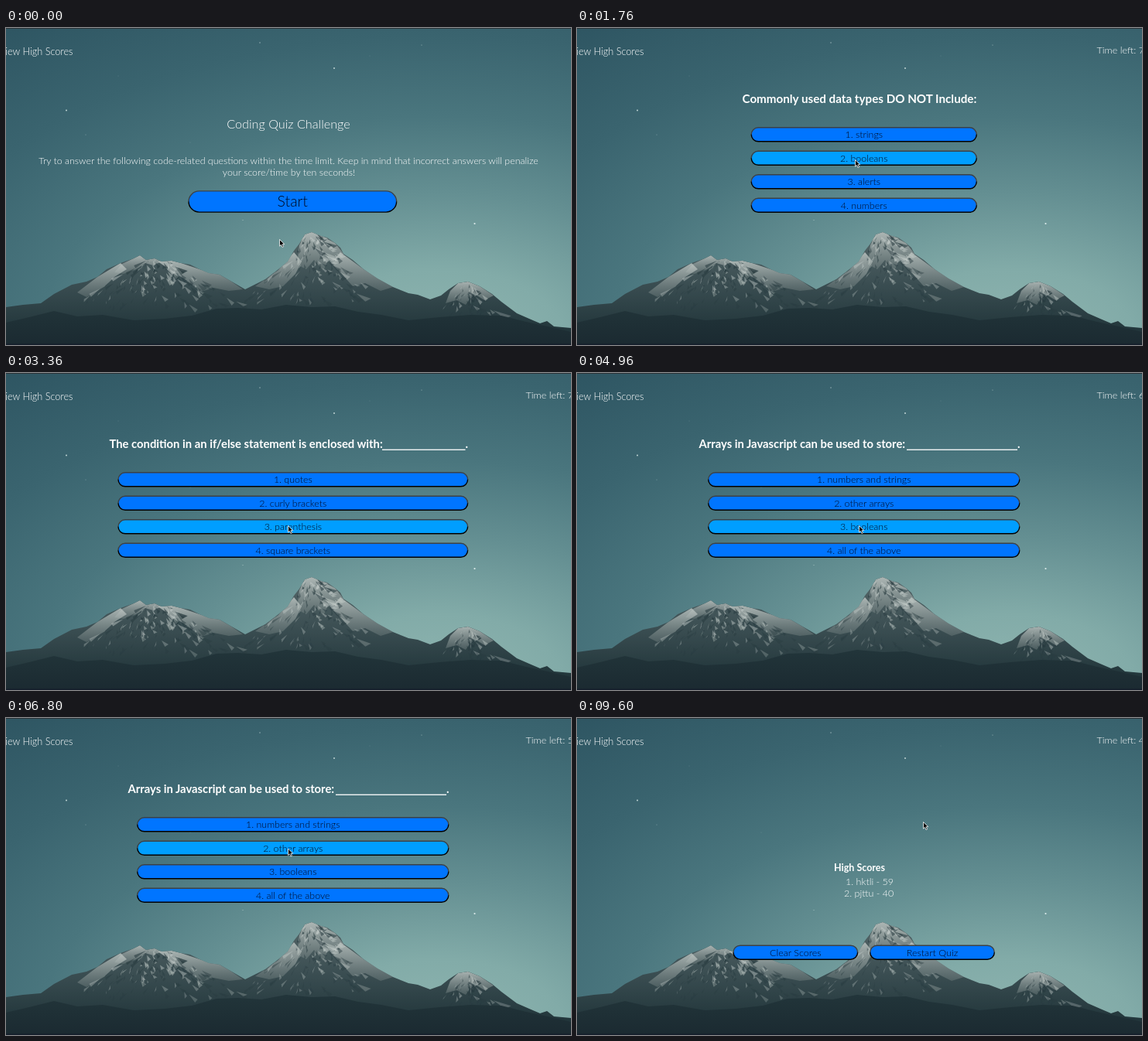
These frames come from a looping animation (730x410 px, 9.68 s). An HTML page:

```html
<!DOCTYPE html>
<html lang="en">
<head>
<meta charset="utf-8">
<title>Coding Quiz</title>
<style>
html, body { margin: 0; width: 100%; height: 100%; overflow: hidden; background: #355a65; }
svg { display: block; width: 730px; height: 410px; }
text { font-family: Lato, "Open Sans", sans-serif; font-weight: 300; fill: #fff; white-space: pre; }
.ink { fill: #000a20; }
.bold { font-weight: 700; }
</style>
</head>
<body>
<svg id="stage" viewBox="0 0 730 410" xmlns="http://www.w3.org/2000/svg">
  <defs>
    <radialGradient id="sky" gradientUnits="userSpaceOnUse" cx="0" cy="0" r="520"
      gradientTransform="translate(560 400) scale(1.8 1)">
      <stop offset="0" stop-color="#8fb5b0"/>
      <stop offset=".17" stop-color="#82aba8"/>
      <stop offset=".36" stop-color="#648f92"/>
      <stop offset=".55" stop-color="#4a767e"/>
      <stop offset=".75" stop-color="#3a646f"/>
      <stop offset="1" stop-color="#2d5461"/>
    </radialGradient>
    <linearGradient id="rock" gradientUnits="userSpaceOnUse" x1="0" y1="264" x2="0" y2="390">
      <stop offset="0" stop-color="#566769"/>
      <stop offset=".5" stop-color="#3c4f53"/>
      <stop offset="1" stop-color="#22363b"/>
    </linearGradient>
    <linearGradient id="snow" x1="0" y1="0" x2="0" y2="1">
      <stop offset="0" stop-color="#c3cbc8" stop-opacity=".8"/>
      <stop offset="1" stop-color="#8c9896" stop-opacity=".3"/>
    </linearGradient>
    <linearGradient id="front" x1="0" y1="0" x2="0" y2="1">
      <stop offset="0" stop-color="#22353a"/>
      <stop offset="1" stop-color="#1b2a31"/>
    </linearGradient>
    <linearGradient id="edge" x1="0" y1="0" x2="0" y2="1">
      <stop offset=".45" stop-color="#3c4146"/>
      <stop offset=".55" stop-color="#000"/>
    </linearGradient>
    <clipPath id="range"><path id="rangeShape"/></clipPath>
  </defs>
  <rect width="730" height="410" fill="url(#sky)"/>
  <g id="stars" fill="#dcebea"></g>
  <g id="hills"></g>
  <rect width="730" height="1" fill="#2b3338"/>
  <rect y="408.5" width="730" height="1.5" fill="#141d2b"/>
  <text x="86.5" y="35" font-size="12.7" text-anchor="end">View High Scores</text>
  <text id="timer" x="671.5" y="32.5" font-size="12.6"></text>
  <g id="scenes"></g>
  <path id="cursor" d="M0 0V8.6L2 6.8L3.4 10L5 9.3L3.6 6.2H6.3Z" fill="#000" stroke="#fff" stroke-width=".8"/>
</svg>
<script>
const NS = 'http://www.w3.org/2000/svg';
const LOOP = 9680, STEP = 80;
const BLUE = '#0075ff', HOVER = '#009eff';
const $ = id => document.getElementById(id);

function add(parent, tag, attrs, content) {
  const el = document.createElementNS(NS, tag);
  for (const k in attrs) el.setAttribute(k, attrs[k]);
  if (content) el.textContent = content;
  parent.appendChild(el);
  return el;
}

function label(parent, x, y, size, content, cls = '', anchor = 'start') {
  return add(parent, 'text', { x, y, 'font-size': size, class: cls, 'text-anchor': anchor }, content);
}

// Landscape
const RIDGE = 'M0 361L22 358L45 356L62 344L85 332L104 328L118 322L130 312L148 304L165 298L173 294' +
  'L181 300L192 298L201 302L214 301L226 304L238 306L250 312L262 317L276 319L290 327L309 338' +
  'L335 325L352 312L364 302L372 288L379 279L386 267L395 264L407 269L415 271L425 278L432 284' +
  'L436 292L448 300L462 312L480 324L500 335L520 343L532 345L548 351L562 346L572 338L584 330' +
  'L597 328L612 334L628 344L640 354L660 369L676 376L690 382L699 379L708 386L730 388V410H0Z';
const SNOW = [
  'M165 298L173 294L181 300L192 298L201 302L190 307L180 304L168 312L152 318L140 316L150 305Z',
  'M196 302L214 301L226 304L250 312L276 319L290 327L306 338L288 340L268 336L252 341L238 330L220 318Z',
  'M118 322L148 304L156 312L140 322L128 334L104 348L92 342Z',
  'M386 267L395 264L407 269L425 278L436 292L430 304L418 296L410 314L398 300L388 312L376 306L379 281Z',
  'M372 290L382 302L374 318L358 334L340 338L322 334L352 313Z',
  'M432 290L462 312L500 335L484 340L464 330L448 334L432 316L420 304Z',
  'M584 330L597 328L612 334L630 346L618 352L604 343L594 358L582 352L568 356L574 340Z'
];
const FRONT = 'M0 381L30 374L62 366L92 373L125 371L165 378L205 376L240 372L272 363L300 362L330 364' +
  'L362 358L395 361L425 360L455 367L485 371L520 378L560 374L600 371L640 372L672 380L700 386L730 393V410H0Z';

let seed = 11;
const rand = () => (seed = seed * 16807 % 2147483647) / 2147483647;

// thin shards of rock and snow falling away from a summit
function crags(g, cx, cy, w, h, count) {
  for (let i = 0; i < count; i++) {
    const v = rand(), side = rand() * 2 - 1;
    const x = cx + side * w * (.1 + v * .9), y = cy + v * h;
    const len = 4 + rand() * 10, lean = side * .8 + rand() - .5, wide = 1 + rand() * 3;
    const [dx, dy, bx] = [lean * len, len * .8, lean * len * .3 + wide].map(n => n.toFixed(1));
    add(g, 'path', {
      d: `M${x.toFixed(1)} ${y.toFixed(1)}l${dx} ${dy}l${bx} -${(len * .3).toFixed(1)}Z`,
      fill: rand() < .42 ? '#c0c9c6' : '#26393e',
      opacity: (.6 - v * .35).toFixed(2)
    });
  }
}

function drawLand() {
  $('rangeShape').setAttribute('d', RIDGE);
  const hills = $('hills');
  add(hills, 'path', { d: RIDGE, fill: 'url(#rock)' });
  const g = add(hills, 'g', { 'clip-path': 'url(#range)' });
  SNOW.forEach(d => add(g, 'path', { d, fill: 'url(#snow)' }));
  crags(g, 195, 298, 110, 60, 170);
  crags(g, 395, 266, 85, 85, 190);
  crags(g, 597, 330, 42, 40, 70);
  add(hills, 'path', { d: FRONT, fill: 'url(#front)' });
  const stars = [[424, 52, .9], [605.5, 253, 1.1], [78, 106.5, .9], [328, 19, .7], [537, 22, .6],
    [306, 248.5, .6], [145, 62, .4], [470, 36, .4], [238, 148, .4], [103, 138, .5]];
  stars.forEach(([cx, cy, r]) => add($('stars'), 'circle', { cx, cy, r, opacity: Math.min(1, r) }));
}

// Pages
const buttons = [];

function scene(from, to) {
  const g = add($('scenes'), 'g', {});
  return Object.assign(g, { from, to });
}

function button(page, x, y, w, h, size, content) {
  const face = add(page, 'rect', {
    x: x + .7, y: y + .7, width: w - 1.4, height: h - 1.4, rx: h / 2 - .7,
    fill: BLUE, stroke: 'url(#edge)', 'stroke-width': 1.4
  });
  label(page, x + w / 2, y + h / 2 + size * .36, size, content, 'ink', 'middle');
  buttons.push({ page, face, x, y, w, h });
}

function question(from, to, left, size, title, blank, x, w, options) {
  const page = scene(from, to);
  label(page, left, 97, size, title, 'bold');
  if (blank) {
    const [a, b] = blank;
    add(page, 'rect', { x: a, y: 98.6, width: b - a, height: 1.3, fill: '#fff' });
    label(page, b, 97, size, '.', 'bold');
  }
  options.forEach((o, i) => button(page, x, 128.1 + i * 30.5, w, 19.4, 12.4, `${i + 1}. ${o}`));
  return page;
}

function scores(page, list, y) {
  label(page, 332, 197.5, 12.5, 'High Scores', 'bold');
  list.forEach((s, i) => label(page, 347 - i * 2, 215.5 + i * 15.5, 12.5, `${i + 1}. ${s}`));
  button(page, 201.3, y, 162, 19.4, 12.5, 'Clear Scores');
  button(page, 378, y, 162, 19.4, 12.5, 'Restart Quiz');
}

const BEGIN = 800, SECOND = 2560, THIRD = 3760, FINISH = 7440, SUBMIT = 9280;
const ENTRY = 'pjttu', FIRST = 'hktli - 59';

drawLand();

const intro = scene(0, BEGIN);
label(intro, 365, 130, 16.2, 'Coding Quiz Challenge', '', 'middle');
label(intro, 365, 176, 12.4, 'Try to answer the following code-related questions within the time limit. ' +
  'Keep in mind that incorrect answers will penalize', '', 'middle');
label(intro, 365.5, 191, 12.4, 'your score/time by ten seconds!', '', 'middle');
button(intro, 235.3, 210.2, 270, 28.6, 19.4, 'Start');

const pages = [
  intro,
  question(BEGIN, SECOND, 213.5, 15.2, 'Commonly used data types DO NOT Include:', null,
    224.5, 292.5, ['strings', 'booleans', 'alerts', 'numbers']),
  question(SECOND, THIRD, 133.5, 14.8, 'The condition in an if/else statement is enclosed with:', [486, 593.5],
    144.3, 453, ['quotes', 'curly brackets', 'parenthesis', 'square brackets']),
  question(THIRD, FINISH, 157.5, 14.8, 'Arrays in Javascript can be used to store:', [426, 569],
    169, 403.5, ['numbers and strings', 'other arrays', 'booleans', 'all of the above'])
];

const form = scene(FINISH, SUBMIT);
add(form, 'rect', { x: 245, y: 123.2, width: 161, height: 20.3, rx: 4, fill: '#fff', stroke: '#30383b', 'stroke-width': 1.2 });
const field = label(form, 247, 138.5, 14.5, '');
button(form, 407, 123.4, 53.5, 19.6, 12.3, 'Submit');
scores(form, [FIRST], 278.2);

const done = scene(SUBMIT, LOOP);
scores(done, [FIRST, ENTRY + ' - 40'], 293.5);
pages.push(form, done);

// Pointer stops: time, x, y
const STOPS = [
  [0, 353.5, 273.5], [560, 357, 228], [880, 357, 228],
  [1600, 359.5, 170.5], [1760, 359.5, 170.5], [2320, 364.5, 197.5], [4960, 364.5, 197.5],
  [5760, 366, 138], [6160, 366, 138], [6720, 364.5, 169], [7760, 364.5, 169],
  [8240, 300, 134], [8720, 300, 134], [9200, 447.5, 134.5], [LOOP, 447.5, 134.5]
];

function pointer(t) {
  let i = 1;
  while (STOPS[i][0] < t) i++;
  const [t0, x0, y0] = STOPS[i - 1], [t1, x1, y1] = STOPS[i];
  const p = (t - t0) / (t1 - t0), e = p * p * (3 - 2 * p);
  return [x0 + (x1 - x0) * e, y0 + (y1 - y0) * e];
}

function timeLeft(t) {
  if (t >= FINISH) return 40;
  return 75 - Math.floor((t - BEGIN) / 490) - (t >= 6720 ? 10 : 0);
}

function render(t) {
  const [x, y] = pointer(t);
  for (const p of pages) p.style.display = t >= p.from && t < p.to ? '' : 'none';
  for (const b of buttons) {
    const over = x > b.x && x < b.x + b.w && y > b.y && y < b.y + b.h;
    b.face.setAttribute('fill', over ? HOVER : BLUE);
  }
  $('timer').textContent = t < BEGIN ? '' : 'Time left: ' + timeLeft(t);
  const typed = ENTRY.slice(0, Math.max(0, Math.floor((t - 8240) / 80)));
  field.textContent = typed || 'Enter your initials';
  field.style.fill = typed ? '#000' : '#5c6163';
  $('cursor').setAttribute('transform', `translate(${x.toFixed(2)} ${y.toFixed(2)})`);
}

const start = performance.now();
function tick() {
  const t = (performance.now() - start) % LOOP;
  render(Math.floor(t / STEP) * STEP);
  requestAnimationFrame(tick);
}
render(0);
requestAnimationFrame(tick);
</script>
</body>
</html>
```
